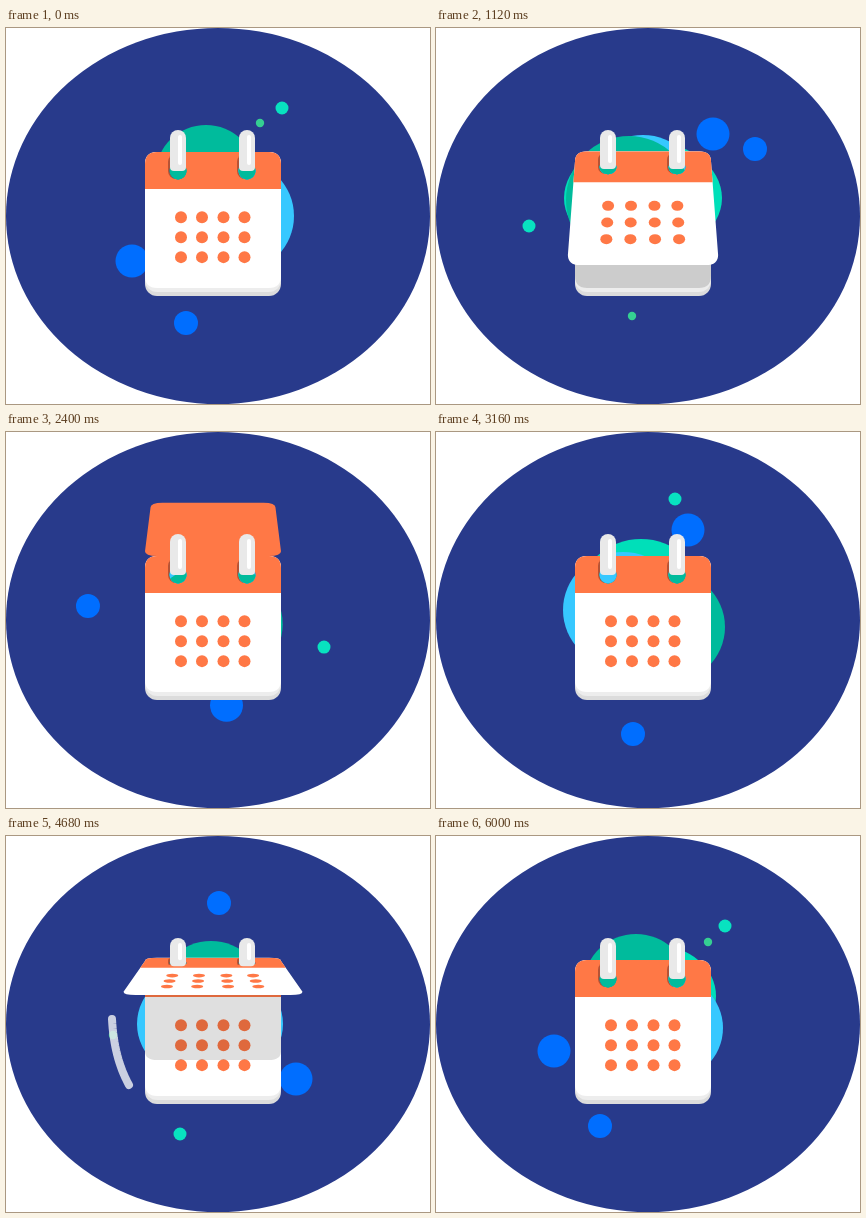
These frames come from a looping animation (424x376 px, 6040 ms). An HTML page with a canvas:

```html
<!DOCTYPE html>
<html lang="en">
<head>
<meta charset="utf-8">
<title>Calendar</title>
<style>
html, body { margin: 0; width: 100%; height: 100%; overflow: hidden; background: #fff; }
canvas { display: block; }
</style>
</head>
<body>
<canvas id="stage" width="424" height="376"></canvas>
<script>
const g = document.getElementById('stage').getContext('2d');
const LOOP = 6040, FLIP = 3040, TAU = Math.PI * 2;
const CX = 207, CY = 182, TOP = 124, PAGE = 136, HALF = 68;
const ORANGE = '#ff7846';
const HOOKS = [-35, 34];

// Poses are given at these times; the last one closes the loop.
const TIMES = [0, 1120, 1800, 3160, 4120, 4680, 6000, LOOP];

// Orbiting dots: radius, colour, turns per loop, positions
const dots = [
  [16.5, '#006eff', 3, [[126,233], [277,106], [120,159], [252,98], [135,258], [290,243], [118,215]]],
  [12, '#006eff', 2, [[180,295], [319,121], [171,58], [197,302], [317,142], [213,67], [164,290]]],
  [6.5, '#08e2c0', 2, [[276,80], [93,198], [210,295], [239,67], [88,198], [174,298], [289,90]]],
  [4.2, '#35cf92', 3, [[254,95], [196,288], [318,154], [196,259], [198,102], [107,199], [272,106]]]
].map(([r, color, turns, points]) => {
  const poses = [];
  [...points, points[0]].forEach(([x, y], i) => {
    let a = Math.atan2(y - CY, x - CX);
    if (i) {
      const guess = poses[i - 1][0] - turns * TAU * (TIMES[i] - TIMES[i - 1]) / LOOP;
      a += TAU * Math.round((guess - a) / TAU);
    }
    poses.push([a, Math.hypot(x - CX, y - CY)]);
  });
  return { r, color, poses };
});

// Soft shapes behind the calendar: colour, then x, y, rx, ry per pose
const blobs = [
  ['#00dfb9', [[220,165,55,48], [207,170,79,58], [200,180,55,50], [205,165,62,58],
               [190,190,61,55], [205,180,60,55], [222,160,58,50]]],
  ['#37c8ff', [[232,188,56,56], [207,165,58,58], [221,160,60,40], [187,178,60,58],
               [192,170,54,54], [204,188,73,60], [230,192,57,54]]],
  ['#00bb9c', [[200,146,50,49], [193,172,63,64], [195,190,72,64], [227,195,62,58],
               [217,176,62,65], [205,160,55,55], [200,148,52,50]]]
].map(([color, poses]) => ({ color, poses: [...poses, poses[0]] }));

// Free edge of the turning page: time, y
const EDGE = [[1040,260], [1080,252], [1120,237], [1200,224], [1320,240], [1440,258], [1520,243],
              [1640,159], [1800,69], [1920,17], [2080,3], [2200,-8], [2380,60], [2500,124]];

const ramp = (t, a, b) => Math.min(1, Math.max(0, (t - a) / (b - a)));

function pose(times, poses, t) {
  let i = 0;
  while (i < times.length - 2 && t >= times[i + 1]) i++;
  const k = ramp(t, times[i], times[i + 1]);
  return poses[i].map((v, j) => v + (poses[i + 1][j] - v) * k);
}

function oval(x, y, rx, ry, color) {
  g.fillStyle = color;
  g.beginPath();
  g.ellipse(x, y, rx, ry, 0, 0, TAU);
  g.fill();
}

function pill(x, y, w, h, r, color) {
  g.fillStyle = color;
  g.beginPath();
  g.roundRect(x, y, w, h, r);
  g.fill();
}

function drawBlobs(t) {
  for (const b of blobs) oval(...pose(TIMES, b.poses, t), b.color);
}

// Sheet hinged at y = top; its free edge at y = end is wider by `flare` on each side.
function sheet(top, end, flare, color) {
  const c = 12 * (end - top) / PAGE, w = HALF + flare;
  g.fillStyle = color;
  g.beginPath();
  g.moveTo(CX - HALF + 12, top);
  g.lineTo(CX + HALF - 12, top);
  g.quadraticCurveTo(CX + HALF, top, CX + HALF, top + c);
  g.lineTo(CX + w, end - c);
  g.quadraticCurveTo(CX + w, end, CX + w - 12, end);
  g.lineTo(CX - w + 12, end);
  g.quadraticCurveTo(CX - w, end, CX - w, end - c);
  g.lineTo(CX - HALF, top + c);
  g.quadraticCurveTo(CX - HALF, top, CX - HALF + 12, top);
  g.fill();
}

function face(top, end, flare) {
  const h = end - top;
  sheet(top, end, flare, '#fff');
  g.save();
  g.beginPath();
  g.rect(0, top, 424, h * 0.272);
  g.clip();
  sheet(top, end, flare, ORANGE);
  g.restore();
  for (const p of [0.48, 0.627, 0.773]) {
    const s = 1 + flare / HALF * p * 1.8;
    for (const x of [-32, -11, 10.5, 31.5]) {
      oval(CX + x * s, top + p * h, 6, Math.max(1.8, 6 * h / PAGE), ORANGE);
    }
  }
}

function drawHoles(top, end, t) {
  const k = (end - top) / PAGE, y = top + 19 * k;
  for (const x of HOOKS) {
    pill(CX + x - 10, top + 2 * k, 17, 25 * k, 8 * k, 'rgba(110,45,35,.5)');
    g.save();
    g.beginPath();
    g.ellipse(CX + x, y, 8.5, 8.5 * k, 0, 0, TAU);
    g.clip();
    g.fillStyle = '#283a8b';
    g.fillRect(CX + x - 9, y - 9, 18, 18);
    drawBlobs(t);
    g.restore();
  }
}

function drawHooks(top, end) {
  for (const x of HOOKS) {
    const left = CX + x - 8, round = top > 102 ? 3 : 8;
    pill(left, top, 16, end - top, [round, round, 4, 4], '#e9e9e9');
    pill(left + 8, top + 5, 4, Math.max(2, end - top - 11), 2, '#fff');
  }
}

// Part of a quadratic curve between fractions a and b
function swoosh([x0, y0, x1, y1, x2, y2], a, b, color) {
  if (b <= a) return;
  g.beginPath();
  for (let i = 0; i <= 16; i++) {
    const k = a + (b - a) * i / 16, m = 1 - k;
    g.lineTo(m * m * x0 + 2 * m * k * x1 + k * k * x2, m * m * y0 + 2 * m * k * y1 + k * k * y2);
  }
  g.strokeStyle = color;
  g.lineWidth = 8;
  g.lineCap = g.lineJoin = 'round';
  g.stroke();
}

function draw(t) {
  const c = t < FLIP ? t : t - FLIP;
  const turning = c >= 1040 && c < 2500, behind = c >= 2200;
  const [edge] = pose(EDGE.map(e => e[0]), EDGE.map(e => [e[1]]), c);
  const u = (edge - TOP) / PAGE, lift = 1 - u * u;
  const hinge = TOP - 2.5 * lift;
  const flare = 23 * lift * (u < 0 ? 1 + 0.73 * u : 1);

  g.clearRect(0, 0, 424, 376);
  oval(212, 188, 212, 188, '#283a8b');
  for (const d of dots) {
    const [a, r] = pose(TIMES, d.poses, t);
    oval(CX + r * Math.cos(a), CY + r * Math.sin(a), d.r, d.r, d.color);
  }
  drawBlobs(t);
  if (turning && behind) sheet(TOP, edge, -flare * 0.4, ORANGE);

  pill(CX - HALF, TOP, HALF * 2, 144, 12, '#dcdcdc');
  pill(CX - HALF, TOP, HALF * 2, 140, 12, '#ededed');
  face(TOP, 260, 0);

  let front = [TOP, 260], hookTop = 102, hookEnd = 143;
  if (turning && !behind) {
    if (u > 0) {
      const shade = 0.2 * ramp(edge, 100, 195);
      sheet(TOP, Math.min(260, edge + 65), 0, `rgba(0,0,0,${shade})`);
      face(hinge, edge, flare);
      front = [hinge, edge];
      hookEnd = Math.min(143, hinge + 4 + (edge - hinge) * 0.12);
    } else {
      drawHoles(...front, t);
      sheet(hinge, edge, flare, ORANGE);
      hookTop = Math.max(102, hinge - 0.2 * (hinge - edge));
    }
  }
  if (!turning || behind || u > 0) drawHoles(...front, t);
  drawHooks(hookTop, hookEnd);

  swoosh([123, 249, 108, 222, 106, 183], ramp(c, 1640, 1760), ramp(c, 1520, 1640), 'rgba(232,234,240,.85)');
  swoosh([293, 141, 301, 122, 296, 103], ramp(c, 1800, 1920), ramp(c, 1690, 1800), 'rgba(255,120,70,.85)');
}

const start = performance.now();
function tick() {
  const t = (performance.now() - start) % LOOP;
  draw(Math.floor(t / 40) * 40);
  requestAnimationFrame(tick);
}
tick();
</script>
</body>
</html>
```
